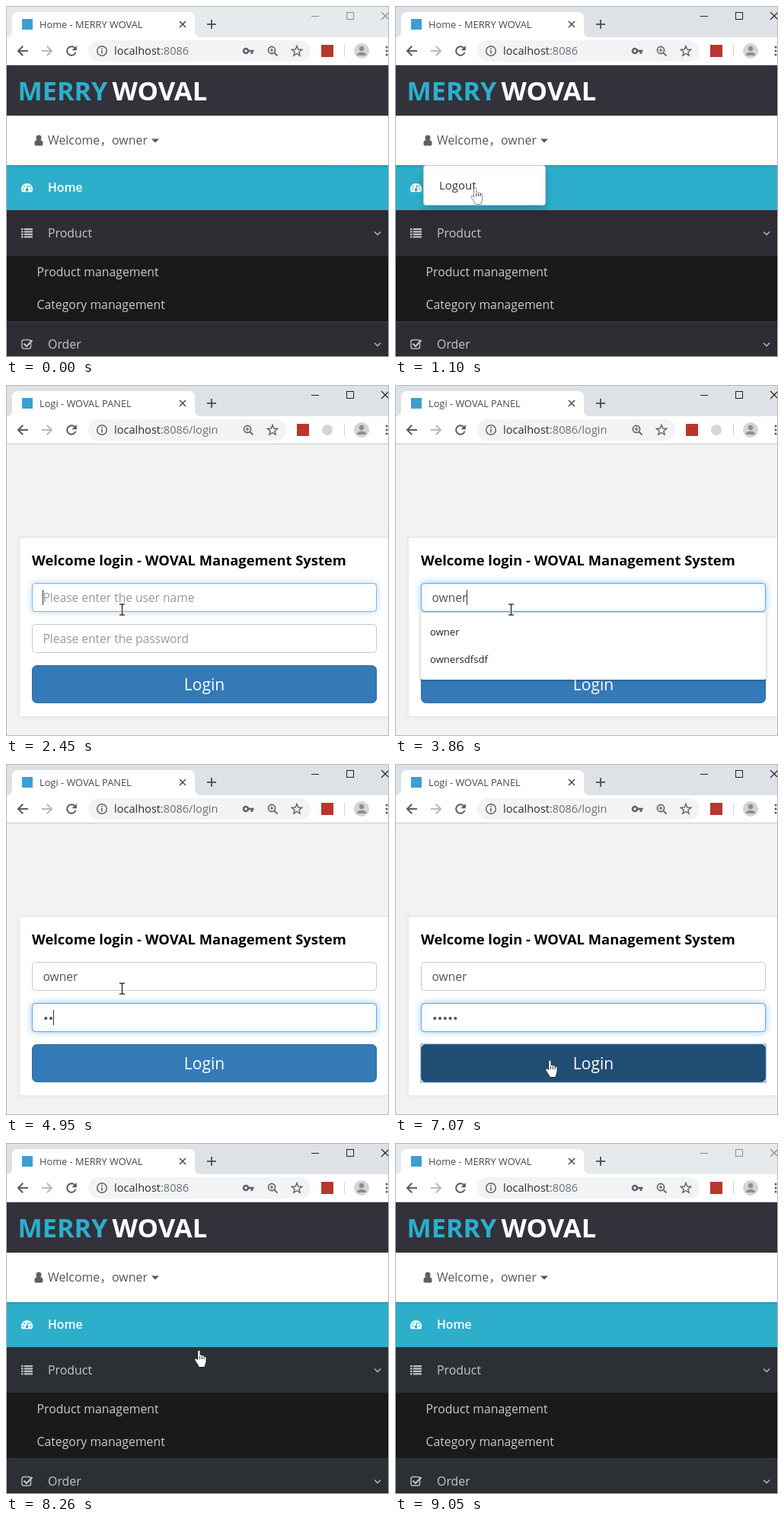
Animation of 503x461 px, one loop 9.21 s. Source, as an HTML page with a canvas:

```html
<!DOCTYPE html>
<html lang="en">
<head>
<meta charset="utf-8">
<title>Shop console login</title>
<style>
html, body { margin: 0; width: 100%; height: 100%; overflow: hidden; background: #fff; }
canvas { display: block; }
</style>
</head>
<body>
<canvas id="stage" width="503" height="461"></canvas>
<script>
const ctx = document.getElementById('stage').getContext('2d');
const LOOP = 9210, STEP = 78.65;
const SANS = '"Open Sans", "Noto Sans CJK SC", "Noto Sans CJK", "Noto Sans", sans-serif';
const USER = 'owner', SHOP = 'WOVAL';

// Moments in ms
const T = {
  open: 620, login: 1180, status: 1490, statusEnd: 2040, icons: 2130,
  focus1: 2360, keys: [3080, 3310, 3550, 3700, 3860], focus2: 4095,
  dots: [4640, 4945, 5095, 5255, 5495], hover: 6985, press: 7065,
  home: 7305, title: 7465, link: 7545, blur: 8885
};

// Pointer path: time, x, y
const PATH = [
  [70, 262, 466], [540, 150, 178], [700, 150, 178], [1000, 106, 240],
  [1960, 106, 240], [2290, 152, 295], [6740, 152, 295], [7000, 204, 391],
  [7930, 204, 391], [8270, 255, 273], [8660, 226, 470]
];

const HAND = new Path2D('M5 1.8C5 0 7.6 0 7.6 1.8V7.3C8.2 6.2 10.3 6.4 10.5 7.7 11.2 7 13 7.4 13.1 8.8 14.2 8.2 15.6 8.9 15.6 10.5V14.5C15.6 17.3 14 18.4 13.8 22H6.4C6 19 3.5 17 1.5 13.5 .5 12 2 10.4 3.5 11.8L5 13.3Z');
const ARROW = new Path2D('M0 0V16.5L3.8 13 6.3 19 8.7 18 6.2 12.2H11.5Z');

const clamp = v => Math.max(0, Math.min(1, v));
const between = (t, a, b) => t >= a && t < b;
const count = (t, list) => list.filter(k => t >= k).length;

function rect(x, y, w, h, color) {
  ctx.fillStyle = color;
  ctx.fillRect(x, y, w, h);
}

function round(x, y, w, h, r, fill, line, width = 1) {
  ctx.beginPath();
  ctx.roundRect(x, y, w, h, r);
  if (fill) { ctx.fillStyle = fill; ctx.fill(); }
  if (line) { ctx.strokeStyle = line; ctx.lineWidth = width; ctx.stroke(); }
}

function disc(x, y, r, color) {
  ctx.beginPath();
  ctx.arc(x, y, r, 0, 7);
  ctx.fillStyle = color;
  ctx.fill();
}

function ring(x, y, r, color, width, from = 0, to = 2 * Math.PI) {
  ctx.beginPath();
  ctx.arc(x, y, r, from, to);
  ctx.strokeStyle = color;
  ctx.lineWidth = width;
  ctx.stroke();
}

// Polyline through x, y pairs
function line(color, width, ...p) {
  ctx.beginPath();
  for (let i = 0; i < p.length; i += 2) ctx.lineTo(p[i], p[i + 1]);
  ctx.strokeStyle = color;
  ctx.lineWidth = width;
  ctx.stroke();
}

function poly(color, ...p) {
  ctx.beginPath();
  for (let i = 0; i < p.length; i += 2) ctx.lineTo(p[i], p[i + 1]);
  ctx.fillStyle = color;
  ctx.fill();
}

function text(s, x, y, size, color, weight = 400, align = 'left') {
  ctx.font = `${weight} ${size}px ${SANS}`;
  ctx.textAlign = align;
  ctx.fillStyle = color;
  ctx.fillText(s, x, y);
  return ctx.measureText(s).width;
}

function magnifier(x, y) {
  ring(x - 1, y - 1, 4.6, '#5f6368', 1.6);
  line('#5f6368', 1.8, x + 2.3, y + 2.3, x + 6.5, y + 6.5);
  line('#5f6368', 1.2, x - 3.4, y - 1, x + 1.4, y - 1);
  line('#5f6368', 1.2, x - 1, y - 3.4, x - 1, y + 1.4);
}

function star(x, y) {
  ctx.beginPath();
  for (let i = 0; i < 10; i++) {
    const r = i % 2 ? 3 : 7, a = i * Math.PI / 5 - Math.PI / 2;
    ctx.lineTo(x + r * Math.cos(a), y + .5 + r * Math.sin(a));
  }
  ctx.closePath();
  ctx.strokeStyle = '#5f6368';
  ctx.lineWidth = 1.4;
  ctx.stroke();
}

function key(x, y) {
  ring(x - 3, y, 3, '#5f6368', 2.6);
  rect(x, y - 1.3, 7.5, 2.6, '#5f6368');
  rect(x + 3.6, y, 2.6, 4, '#5f6368');
}

function tabStrip(active, title) {
  rect(1, 1, 501, 40, active ? '#dee1e6' : '#e7eaed');
  ctx.beginPath();
  ctx.moveTo(1, 41);
  ctx.quadraticCurveTo(8, 41, 8, 33);
  ctx.lineTo(8, 16);
  ctx.quadraticCurveTo(8, 8, 16, 8);
  ctx.lineTo(240, 8);
  ctx.quadraticCurveTo(248, 8, 248, 16);
  ctx.lineTo(248, 33);
  ctx.quadraticCurveTo(248, 41, 256, 41);
  ctx.fillStyle = '#fff';
  ctx.fill();
  rect(21, 17, 14, 14, '#3c9fd2');
  text(title, 44, 29, 12.8, '#45494d');
  line('#4a4d51', 1.6, 228, 20, 236, 28);
  line('#4a4d51', 1.6, 236, 20, 228, 28);
  line('#4a4d51', 1.8, 264, 24, 276, 24);
  line('#4a4d51', 1.8, 270, 18, 270, 30);
  const c = active ? '#222' : '#8b8d90';
  line(c, 1, 401, 13.5, 411, 13.5);
  ctx.strokeRect(447.5, 8.5, 9, 9);
  line(c, 1.1, 493, 8, 502, 17);
  line(c, 1.1, 493, 18, 502, 9);
}

function toolbar(path, mode) {
  const shift = mode === 'wide' ? 32 : 0;
  rect(1, 41, 501, 36, '#fff');
  rect(1, 77, 501, 1, '#c9cbce');
  const g = '#55585c';
  line(g, 1.9, 29, 59, 16.5, 59);
  line(g, 1.9, 22.3, 52.8, 16, 59, 22.3, 65.2);
  line('#b4b7ba', 1.9, 47, 59, 59.5, 59);
  line('#b4b7ba', 1.9, 53.7, 52.8, 60, 59, 53.7, 65.2);
  ring(86, 59, 5.8, g, 1.9, .3, 5.5);
  poly(g, 92.8, 52, 92.8, 58.3, 86.5, 58.3);

  round(108, 45, 292 - shift, 28, 14, '#f1f3f4');
  ring(126, 59, 6.3, '#5f6368', 1.5);
  rect(125.2, 58, 1.6, 4.5, '#5f6368');
  rect(125.2, 55, 1.6, 1.7, '#5f6368');
  const w = text('localhost', 142, 64, 14.55, '#2b2e31');
  text(':8086' + path, 142 + w, 64, 14.55, '#6b7075');

  if (mode === 'key') key(318, 59);
  magnifier(350 - shift, 59);
  star(382 - shift, 59);
  if (mode === 'wide') {
    rect(382, 51, 16, 16, '#b8372c');
    disc(422, 59, 7, '#d3d5d7');
  } else rect(414, 51, 16, 16, mode === 'key' ? '#b8372c' : '#e2e2e3');
  rect(444, 51, 1, 16, '#d0d2d5');
  disc(467, 59, 10, '#d3d4d6');
  disc(467, 56, 3.2, '#8b8e92');
  ctx.beginPath();
  ctx.ellipse(467, 64, 6, 3.2, 0, Math.PI, 0);
  ctx.lineTo(473, 65);
  ctx.lineTo(461, 65);
  ctx.fill();
  for (const y of [54, 59, 64]) disc(500, y, 1.5, '#55585c');
}

function chevron(y) {
  line('#b5b8bb', 1.5, 484, y - 2, 488, y + 2, 492, y - 2);
}

function homePage(row, menu) {
  rect(1, 78, 501, 66, '#33323a');
  text('MERRY', 15.5, 124, 34.2, '#2bafcd', 700);
  text(SHOP, 139.5, 124, 34.6, '#fff', 700);
  rect(1, 144, 501, 65, '#fff');
  disc(43, 173, 3.5, '#5c6066');
  round(37.5, 176, 11, 7.5, [4, 4, 2, 2], '#5c6066');
  text('Welcome，' + USER, 55, 182, 15.9, '#53575d');
  poly('#53575d', 191, 174.5, 201, 174.5, 196, 179.5);

  rect(1, 209, 501, 59, '#2dafcc');
  const shade = ctx.createLinearGradient(0, 209, 0, 213);
  shade.addColorStop(0, 'rgba(0,0,0,.12)');
  shade.addColorStop(1, 'rgba(0,0,0,0)');
  rect(1, 209, 501, 4, shade);
  ctx.beginPath();
  ctx.arc(27.5, 240.5, 7.6, Math.PI * .84, Math.PI * .16);
  ctx.closePath();
  ctx.fillStyle = '#fff';
  ctx.fill();
  line('#2dafcc', 1.3, 27.5, 241, 29, 235.5);
  for (const [x, y] of [[22.7, 240.5], [24, 236.8], [31.3, 236.8], [32.5, 240.5]]) disc(x, y, 1, '#2dafcc');
  disc(27.5, 241.5, 1.9, '#2dafcc');
  text('Home', 55, 244, 15.8, '#fff', 600);

  rect(1, 268, 501, 60, row);
  rect(1, 268, 501, 1, '#393b3f');
  for (let i = 0; i < 4; i++) {
    rect(20, 292 + i * 3.4, 2.6, 2.2, '#c3c5c8');
    rect(23.8, 292 + i * 3.4, 11.2, 2.2, '#c3c5c8');
  }
  text('Product', 55, 304, 15.9, '#c4c7ca');
  chevron(298.5);
  rect(1, 328, 501, 86, '#191a1c');
  text('Product management', 40.5, 355, 15.8, '#c8cacc');
  text('Category management', 40.5, 398, 15.8, '#c8cacc');
  rect(1, 414, 501, 46, row);
  rect(1, 414, 501, 1, '#393b3f');
  round(21, 438.5, 11.5, 11.5, 2.5, null, '#b5b8bb', 1.5);
  line('#c3c5c8', 2.1, 23.5, 443.5, 27, 447, 34.5, 439);
  text('Order', 55, 450, 15.9, '#c4c7ca');
  chevron(444.5);

  if (menu) {
    ctx.save();
    ctx.shadowColor = 'rgba(0,0,0,.18)';
    ctx.shadowBlur = 12;
    ctx.shadowOffsetY = 6;
    round(37.5, 209.5, 160, 52, 3, '#fff', '#ccc');
    ctx.restore();
    text('Logout', 58, 241, 15, '#333');
  }
}

function field(y, glow) {
  ctx.save();
  if (glow > 0) {
    ctx.shadowColor = `rgba(102,175,233,${.7 * glow})`;
    ctx.shadowBlur = 8;
  }
  round(34.5, y + .5, 452, 37, 4, '#fff', '#c8c8c8');
  ctx.restore();
  if (glow > 0) round(34.5, y + .5, 452, 37, 4, null, `rgba(92,170,232,${glow})`);
}

function caret(x, y) {
  rect(Math.round(x), y, 1, 20, '#333');
}

function loginPage(t) {
  const typed = count(t, T.keys), dots = count(t, T.dots);
  rect(1, 78, 501, 382, '#f2f2f2');
  ctx.save();
  ctx.shadowColor = 'rgba(0,0,0,.08)';
  ctx.shadowBlur = 2;
  rect(17, 200, 490, 236, '#e9e9e9');
  ctx.restore();
  rect(18, 201, 484, 234, '#fff');
  text(`Welcome login - ${SHOP} Management System`, 34, 237, 18.36, '#000', 700);

  field(260, clamp((t - T.focus1) / 150) * clamp(1 - (t - T.focus2) / 150));
  const w = typed ? text(USER.slice(0, typed), 48.5, 285, 15.6, '#555') : 0;
  if (!typed) text('Please enter the user name', 48.5, 285, 15.55, '#999');
  if (between(t, T.focus1, 2840) || between(t, T.keys[0], T.focus2)) caret(48 + w, 269);

  field(314, clamp((t - T.focus2) / 150) * clamp(1 - (t - T.press) / 150));
  if (!dots) text('Please enter the password', 48.5, 339, 15.55, '#999');
  for (let i = 0; i < dots; i++) disc(52.3 + i * 6.75, 334, 2.1, '#555');
  if (between(t, 4245, 5955) || between(t, 6505, T.press)) caret(48.3 + dots * 6.75, 323);

  const dark = t >= T.press;
  round(34.5, 368.5, 452, 49, 6, dark ? '#204d74' : t >= T.hover ? '#286090' : '#337ab7', dark ? '#1b4060' : '#2e6da4');
  if (dark) round(34, 368, 453, 50, 0, null, '#4f86cc');
  text('Login', 260.5, 401, 21, '#fff', 400, 'center');

  if (between(t, T.keys[0], T.focus2)) {
    ctx.save();
    ctx.shadowColor = 'rgba(0,0,0,.3)';
    ctx.shadowBlur = 4;
    ctx.shadowOffsetY = 1;
    round(34, 299, 453, 88, 2, '#fff');
    ctx.restore();
    text(USER, 46, 329, 13.1, '#222');
    text(USER + 'sdfsdf', 46, 365, 13.1, '#222');
  }
}

function statusBar(s, width) {
  round(-3.5, 439.5, width + 4, 25, 4, '#fff', '#c4c6c8');
  text(s, 3, 455, 12, '#6a6d70');
}

function pointerAt(t) {
  if (t < PATH[0][0] || t >= PATH[PATH.length - 1][0]) return null;
  const q = PATH[0][0] + Math.floor((t - PATH[0][0]) / STEP) * STEP;
  const i = Math.max(1, PATH.findIndex(p => p[0] > q));
  const [a, b] = [PATH[i - 1], PATH[i]];
  const k = clamp((q - a[0]) / (b[0] - a[0])), e = k * k * (3 - 2 * k);
  return [a[1] + (b[1] - a[1]) * e, a[2] + (b[2] - a[2]) * e];
}

function pointer(x, y, kind) {
  ctx.save();
  ctx.translate(Math.round(x), Math.round(y));
  if (kind === 'beam') {
    for (const [c, w] of [['#fff', 2.6], ['#111', 1.2]]) {
      line(c, w, .5, -7, .5, 7);
      line(c, w, -3, -7, 4, -7);
      line(c, w, -3, 7, 4, 7);
    }
  } else {
    if (kind === 'hand') ctx.translate(-7, -2);
    const shape = kind === 'hand' ? HAND : ARROW;
    ctx.fillStyle = '#fff';
    ctx.strokeStyle = '#000';
    ctx.lineWidth = 1;
    ctx.stroke(shape);
    ctx.fill(shape);
    if (kind === 'hand') {
      for (const fx of [7.6, 10.4, 13.1]) line('#000', .8, fx, 8, fx, 12);
    }
  }
  ctx.restore();
}

function draw(t) {
  const onLogin = between(t, T.login, T.home);
  const active = between(t, T.open, T.blur);
  const loginTitle = between(t, T.login, T.title);
  const spot = pointerAt(t);
  rect(0, 0, 503, 461, '#fff');
  tabStrip(active, loginTitle ? `Logi - ${SHOP} PANEL` : `Home - MERRY ${SHOP}`);

  let mode = 'key';
  if (between(t, T.login, T.icons)) mode = 'loading';
  else if (between(t, T.icons, T.dots[0])) mode = 'wide';
  toolbar(onLogin ? '/login' : '', mode);

  if (onLogin) loginPage(t);
  else homePage(t < T.login ? '#2e2d33' : '#2c3034', between(t, T.open, T.login));

  if (between(t, T.status, T.statusEnd)) statusBar('正在连接...', 171);
  if (t >= T.link && spot && spot[1] > 370 && t < 8200) statusBar('localhost:8086/product-category', 178);

  if (spot) {
    const [x, y] = spot;
    const kind = onLogin ? (y > 368 ? 'hand' : 'beam') : y > 168 ? 'hand' : 'arrow';
    pointer(x, y, kind);
  }
  ctx.strokeStyle = '#b3b7bb';
  ctx.lineWidth = 1;
  ctx.strokeRect(.5, .5, 502, 460);
}

const start = performance.now();
function tick() {
  draw((performance.now() - start) % LOOP);
  requestAnimationFrame(tick);
}
tick();
</script>
</body>
</html>
```
